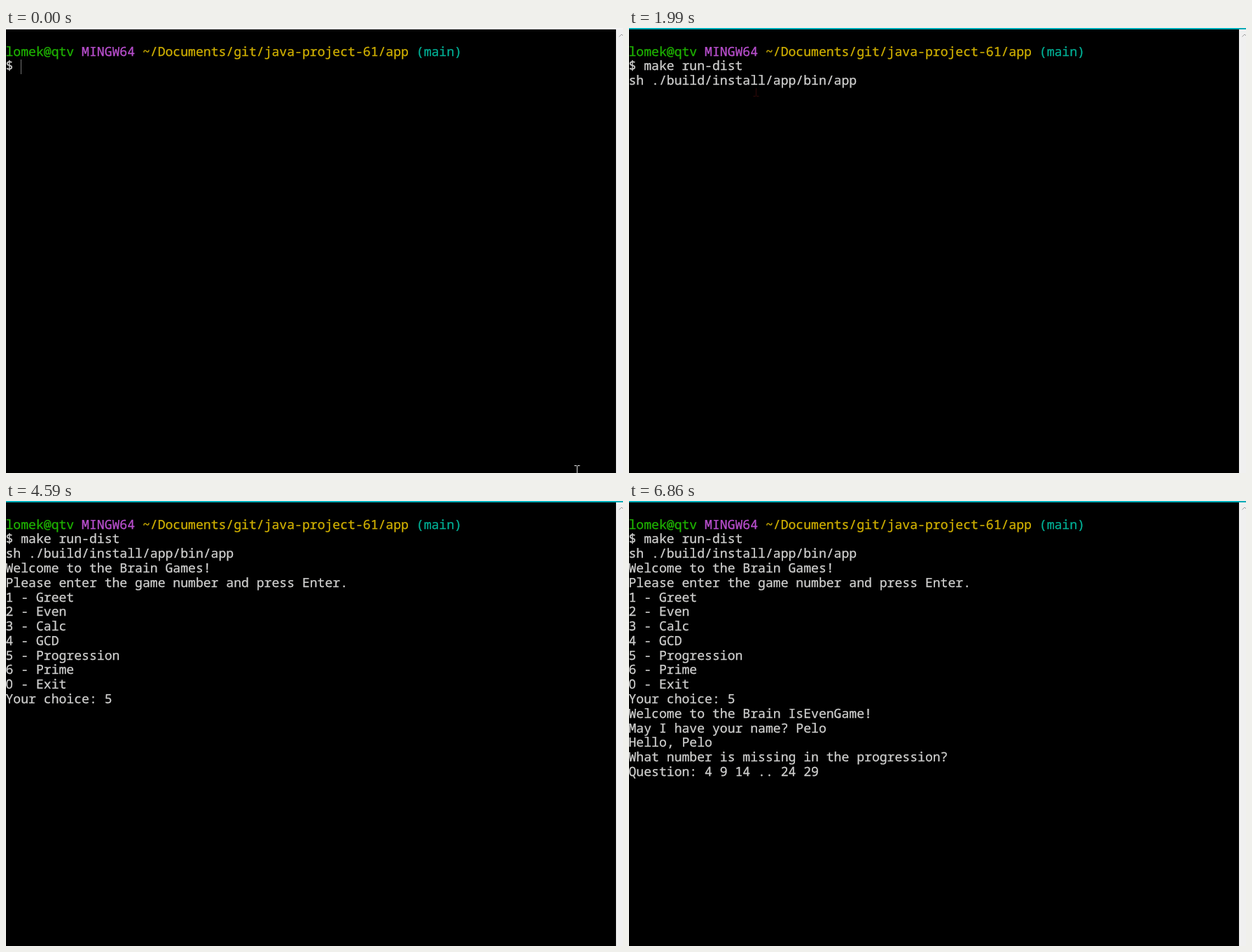
Write an HTML page that moves like this. It is 881 px wide and 636 px high and loops after 8 s.

```html
<!DOCTYPE html>
<html lang="en">
<head>
<meta charset="utf-8">
<title>Terminal session</title>
<style>
  html, body { margin: 0; width: 100%; height: 100%; overflow: hidden; background: #000; }
  svg { display: block; width: 881px; height: 636px; }
  text {
    font: 18.1px "Noto Sans Mono", "DejaVu Sans Mono", monospace;
    text-rendering: geometricPrecision;
    white-space: pre;
    color: #d0d0cf;
  }
  text, tspan { fill: currentColor; stroke: currentColor; stroke-width: .3px; }
  .user { color: #1eb400; }
  .sys { color: #b94fce; }
  .path { color: #d0b000; }
  .branch { color: #00b096; }
  .zero { font-family: "Noto Sans", sans-serif; letter-spacing: .5px; }
</style>
</head>
<body>
<svg viewBox="0 0 881 636">
  <rect width="881" height="636"/>
  <path id="beam" d="M-4 -7.5h3.5M.5 -7.5h3.5M0 -7V7M-4 7.5h3.5M.5 7.5h3.5" fill="none"/>
  <rect id="mask" x="170" y="66" width="20" height="20"/>
  <g id="screen">
    <text x="-.5" y="40"><tspan class="user">lomek@qtv</tspan> <tspan class="sys">MINGW64</tspan> <tspan class="path">~/Documents/git/java-project-61/app</tspan> <tspan class="branch">(main)</tspan></text>
  </g>
  <rect id="caret" width="1" height="21"/>
  <rect x="871" y="2" width="10" height="634" fill="#f0f0f0"/>
  <path d="M875.5 12.5l3.5-3.5 3.5 3.5" fill="none" stroke="#a0a0a0"/>
  <rect id="edge" width="881" height="2"/>
</svg>
<script>
  const LOOP = 8000, PITCH = 20.78, FOCUS = 410, TYPING = 1200, RUN = 1990;
  const $ = id => document.getElementById(id);
  const set = (el, attrs) => { for (const k in attrs) el.setAttribute(k, attrs[k]); };
  const shown = on => on ? 'visible' : 'hidden';

  // [time, first row, lines]
  const output = [
    [0, 1, '$'],
    [TYPING, 1, '$ clear'],
    [1530, 1, '$ make run-dist'],
    [RUN, 2, 'sh ./build/install/app/bin/app'],
    [2470, 3, 'Welcome to the Brain Games!', 'Please enter the game number and press Enter.',
      '1 - Greet', '2 - Even', '3 - Calc', '4 - GCD', '5 - Progression', '6 - Prime',
      '0 - Exit', 'Your choice:'],
    [4060, 12, 'Your choice: 5'],
    [4790, 13, 'Welcome to the Brain IsEvenGame!', 'May I have your name?'],
    [5870, 14, 'May I have your name? P'],
    [6070, 14, 'May I have your name? Pe'],
    [6200, 14, 'May I have your name? Pel'],
    [6460, 14, 'May I have your name? Pelo'],
    [6860, 15, 'Hello, Pelo', 'What number is missing in the progression?',
      'Question: 4 9 14 .. 24 29']
  ];

  // [time, x, row]; only a time means hidden
  const carets = [
    [0, 21, 1], [940], [TYPING, 75, 1], [1530, 162, 1], [1860, 0, 2], [RUN],
    [2470, 141, 12], [3000], [3530, 141, 12], [4060, 151, 12], [4590],
    [4790, 239, 14], [5340], [5870, 249, 14], [6070, 260, 14], [6200, 271, 14],
    [6460, 282, 14], [6790, 0, 15], [6860]
  ];
  const moves = [70, 140, 200, 270, 340, 410, 540];

  const rows = [];
  for (let n = 1; n < 18; n++) {
    const el = document.createElementNS('http://www.w3.org/2000/svg', 'text');
    set(el, { x: -.5, y: Math.round(39.6 + PITCH * n) });
    rows[n] = $('screen').appendChild(el);
  }

  // the leading zero is drawn without a slash
  function write(el, text) {
    if (el.textContent === text) return;
    el.innerHTML = text.replace(/^0/, '<tspan class="zero">0</tspan>');
  }

  function draw(t) {
    const lines = [];
    for (const [at, first, ...texts] of output)
      if (t >= at) texts.forEach((s, i) => lines[first + i] = s);
    rows.forEach((el, n) => write(el, lines[n] || ''));

    const focused = t >= FOCUS;
    const [, x = 0, row = 0] = carets.filter(c => t >= c[0]).pop();
    set($('caret'), {
      x, y: Math.round(23.9 + PITCH * row),
      fill: focused ? '#bfbfbf' : '#707070',
      visibility: shown(row)
    });
    set($('edge'), { fill: focused ? '#00acb8' : '#f4f4f4' });

    const p = moves.filter(m => t >= m).length / moves.length;
    const k = p * p * (3 - 2 * p);
    set($('beam'), {
      transform: `translate(${Math.round(815 - 634 * k) + .5} ${Math.round(633 - 543 * k)})`,
      stroke: t < TYPING ? '#e0e0e0' : '#300808',
      visibility: shown(t < 2470)
    });
    // new output wipes the upper part of the pointer's ghost
    set($('mask'), { visibility: shown(t >= RUN) });
  }

  function frame() {
    draw(performance.now() % LOOP);
    requestAnimationFrame(frame);
  }
  frame();
</script>
</body>
</html>
```
